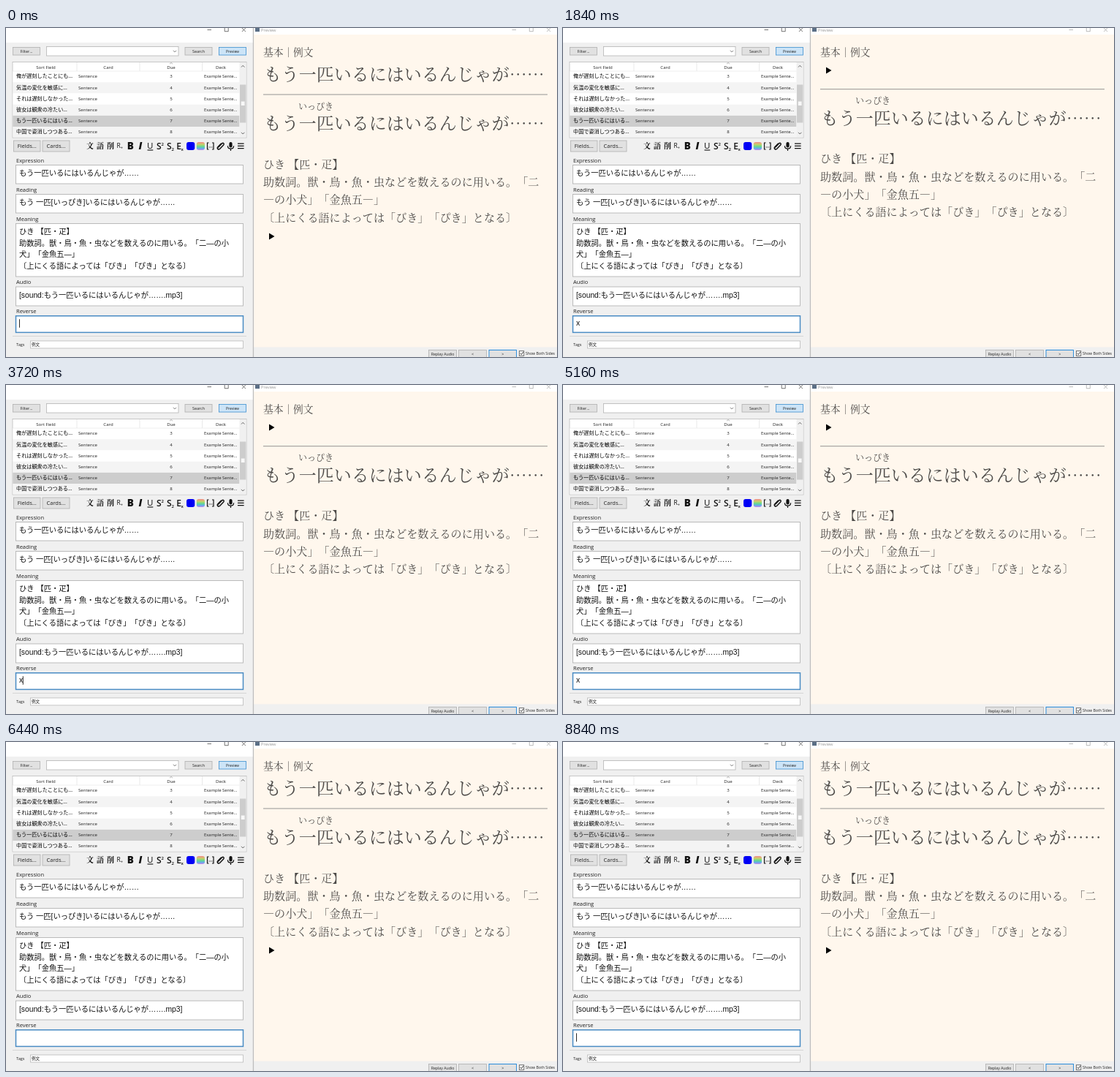
An HTML page for the animation above (8960 ms loop, 754 by 450 pixels).

```html
<!DOCTYPE html>
<html lang="ja">
<head>
<meta charset="utf-8">
<title>Card editor and preview</title>
<style>
html, body { margin: 0; width: 100%; height: 100%; overflow: hidden; background: #f0f0f0; }
svg { display: block; width: 754px; height: 450px; }
text { white-space: pre; text-spacing-trim: space-all; font-feature-settings: "chws" 0; }
.ui { font-family: "Open Sans", "Noto Sans", "Noto Sans CJK JP", sans-serif; fill: #222; }
.field { font-family: "Liberation Sans", "Noto Sans CJK JP", "Noto Sans CJK", sans-serif; fill: #111; }
.row { font-family: "Open Sans", "Noto Sans CJK JP", "Noto Sans CJK", sans-serif; fill: #000; font-weight: 500; }
.card { font-family: "Noto Serif CJK JP", "Noto Serif JP", "Noto Sans CJK JP", "Noto Sans CJK", serif; font-weight: 300; fill: #4c4a48; }
.icon { font-family: "Open Sans", "Noto Sans", sans-serif; fill: #111; }
</style>
</head>
<body>
<svg id="stage" viewBox="0 0 754 450">
  <defs>
    <linearGradient id="rainbow" x2="0" y2="1">
      <stop offset="0" stop-color="#f58a8a"/><stop offset=".3" stop-color="#c8cf6a"/>
      <stop offset=".55" stop-color="#62dc8c"/><stop offset=".8" stop-color="#65a9ee"/>
      <stop offset="1" stop-color="#c987e8"/>
    </linearGradient>
  </defs>
</svg>
<script>
const stage = document.getElementById("stage");

function add(tag, attrs, parent = stage) {
  const el = document.createElementNS(stage.namespaceURI, tag);
  for (const key in attrs) el.setAttribute(key, attrs[key]);
  return parent.appendChild(el);
}
function box(x, y, right, bottom, fill, stroke, more = {}, parent = stage) {
  const attrs = { x, y, width: right - x, height: bottom - y, fill, ...more };
  if (stroke) attrs.stroke = stroke;
  return add("rect", attrs, parent);
}
function label(str, x, y, size, cls = "ui", more = {}, parent = stage) {
  const el = add("text", { x, y, "font-size": size, class: cls, ...more }, parent);
  el.textContent = str;
  return el;
}
function line(d, stroke, width = 1, parent = stage) {
  return add("path", { d, stroke, "stroke-width": width, fill: "none" }, parent);
}
const middle = { "text-anchor": "middle" };

function button(str, x, y, right, bottom, size, fill = "#e1e1e1", stroke = "#b0b0b0") {
  box(x, y, right, bottom, fill, stroke, { "stroke-width": 0.8 });
  label(str, (x + right) / 2, (y + bottom) / 2 + size * 0.36, size, "ui", middle);
}
function windowControls(x, gap, color) {
  line(`M${x} 2.5h5.5M${x + gap} 0v4.7h5v-4.7M${x + 2 * gap} 0l5 5m0-5l-5 5`, color, 0.8);
}

function drawEditor() {
  box(0, 0, 338, 450, "#f0f0f0");
  box(0, 0, 338, 20, "#fff");
  windowControls(275.5, 23.7, "#555");

  button("Filter...", 9.5, 26.5, 46.5, 37, 5.4);
  box(55.5, 25.5, 236, 38, "#fff", "#b5b5b5", { "stroke-width": 0.8 });
  line("M229 30.8l2 2 2-2", "#555", 0.8);
  button("Search", 245, 26.5, 282, 37, 5.4);
  button("Preview", 291.5, 26.5, 328.5, 37, 5, "#cce4f7", "#3c8fd0");

  drawTable();

  button("Fields...", 10.5, 154, 47, 169, 7.5);
  button("Cards...", 50, 154, 87, 169, 7.5);
  drawToolbar();

  drawField("Expression", 187.5, 213, ["もう一匹いるにはいるんじゃが……"]);
  drawField("Reading", 227.5, 253, ["もう 一匹[いっぴき]いるにはいるんじゃが……"]);
  drawField("Meaning", 267.5, 340, ["ひき 【匹・疋】",
    "助数詞。獣・鳥・魚・虫などを数えるのに用いる。「二―の小",
    "犬」「金魚五―」", "〔上にくる語によっては「びき」「ぴき」となる〕"]);
  drawField("Audio", 354, 380, ["[sound:もう一匹いるにはいるんじゃが…….mp3]"]);
  drawField("Reverse", 393.8, 416.4, [], "#4a8cc4", 1.5);

  line("M9 421.5H329", "#cfcfcf", 0.8);
  label("Tags", 14, 435.2, 5.6);
  box(33.5, 428, 324.5, 438, "#fff", "#b8b8b8", { "stroke-width": 0.8 });
  label("例文", 35, 435.2, 5.6);
}

function drawField(name, y, bottom, lines, stroke = "#b4b4b4", width = 0.9) {
  label(name, 14, y - 3.8, 7.5);
  box(13.5, y, 324.5, bottom, "#fff", stroke, { "stroke-width": width });
  lines.forEach((str, i) => label(str, 18, y + 14.6 + i * 15.5, 10.28, "field"));
}

function drawTable() {
  box(9, 46.5, 329, 150, "#fff", "#bcbcbc", { "stroke-width": 0.8 });
  [["Sort Field", 54.5], ["Card", 140], ["Due", 226], ["Deck", 294]]
    .forEach(([str, x]) => label(str, x, 55.6, 6.1, "ui", middle));
  line("M224 49.2l2-1.8 2 1.8", "#777", 0.6);
  const rows = ["俺が遅刻したことにも…", "気温の変化を敏感に…", "それは遅刻しなかった…",
    "彼女は観衆の冷たい…", "もう一匹いるにはいる…", "中国で姿消しつつある…"];
  rows.forEach((str, i) => {
    const y = 59 + i * 15.2, base = y + 9.3;
    const fill = i === 4 ? "#cdcdcd" : i % 2 ? "#f4f4f4" : "#fff";
    box(9.4, y, 319.5, Math.min(y + 15.2, 149.6), fill);
    label(str, 14, base, 7.15, "row");
    label("Sentence", 99, base, 6.05);
    label(i + 3, 226, base, 6.1, "ui", middle);
    label("Example Sente...", 271, base, 5.9);
  });
  line("M97 47V59M183 47V59M268.5 47V59", "#e0e0e0", 0.7);
  line("M9.5 59H319.5", "#e4e4e4", 0.6);
  box(319.5, 47, 328.6, 149.6, "#f0f0f0");
  box(320, 77.5, 328.4, 129.5, "#cdcdcd");
  box(321.8, 100.5, 326.6, 106, "#f8f8f8");
  line("M322 53.5l2.2-2.2 2.2 2.2M322 142.8l2.2 2.2 2.2-2.2", "#555", 0.9);
}

function drawToolbar() {
  const ink = "#111";
  ["文", "語", "削"].forEach((ch, i) =>
    label(ch, 115 + i * 14, 165, 10, "card", { ...middle, style: "fill:#111;font-weight:600" }));
  label("R", 151.5, 163.8, 8.5, "icon");
  label("+", 156.6, 166, 6, "icon");
  const bold = { ...middle, "font-weight": 800 };
  label("B", 170.3, 166, 13.5, "icon", bold);
  label("I", 184, 166, 13.5, "icon", { ...bold, "font-style": "italic" });
  label("U", 197.3, 164.8, 11.5, "icon", middle);
  line("M193.5 167h7.8", ink, 1.1);
  const semi = { "font-weight": 600 };
  [["S", "2", 206, 161], ["S", "2", 220, 168], ["E", "x", 233.2, 167.5]].forEach(([big, small, x, y]) => {
    label(big, x, 165.6, 12, "icon", semi);
    label(small, x + 6.4, y, 6, "icon", semi);
  });
  box(247, 156, 258.3, 167, "#0000f5", null, { rx: 3 });
  box(260.8, 156, 272, 167, "url(#rainbow)", null, { rx: 3 });
  line("M277.5 157h-2v9h2M282 157h2v9h-2", ink, 1.2);
  line("M277.5 163h5", ink, 1.1).setAttribute("stroke-dasharray", "1 1");
  line("M290.5 163.2l5-5.2c1.8-1.6 3.6.4 2.2 2l-5 5.2c-2.2 2-4.6-.6-2.6-2.8l4.6-4.7", ink, 1.5);
  box(305.4, 156, 309.6, 163.5, ink, null, { rx: 2.1 });
  line("M303.4 161.2c0 5.2 8.2 5.2 8.2 0M307.5 165v3", ink, 1.2);
  line("M317 158.2h8.6M317 161.4h8.6M317 164.6h8.6", ink, 1.3);
}

function cardText(str, x, y, size, parent) {
  label(str, x, y, size, "card", {}, parent);
}
function playMark(y, parent) {
  add("path", { d: `M360 ${y - 4.5}v9l7.5-4.5z`, fill: "#000" }, parent);
}

function drawPreview() {
  box(337.8, 0, 339.3, 450, "#bdbdbd");
  box(339.3, 0, 754, 450, "#f0f0f0");
  box(339.3, 0, 754, 9, "#fff");
  box(339.3, 9, 754, 436.5, "#fff7ed");
  box(341, 0, 347, 5, "#5b6f86");
  label("Preview", 349, 4.6, 5.7, "ui", { style: "fill:#999" });
  windowControls(692.5, 23.8, "#aaa");
  cardText("基本｜例文", 352, 37.7, 13.7);

  const front = add("g", {});
  const sentence = "もう一匹いるにはいるんじゃが……";
  cardText(sentence, 352.8, 72, 24, front);
  const emptyFront = add("g", {});
  playMark(58, emptyFront);

  const back = add("g", {});
  line("M352 91H741", "#888", 0.9, back);
  cardText("いっぴき", 400, 111.8, 12, back);
  cardText(sentence, 352.8, 139, 24, back);
  ["ひき 【匹・疋】", "助数詞。獣・鳥・魚・虫などを数えるのに用いる。「二", "―の小犬」「金魚五―」",
    "〔上にくる語によっては「びき」「ぴき」となる〕"]
    .forEach((str, i) => cardText(str, 352, 191.5 + i * 24.4, 15.1, back));
  playMark(285, front);

  button("Replay Audio", 578.5, 440.5, 616.5, 451, 5.2);
  button("<", 619.5, 440.5, 657.5, 451, 5.4);
  button(">", 661, 440.5, 698.5, 451, 5.4, "#e1e1e1", "#0078d7");
  box(702.3, 441.8, 708.8, 448.3, "#fff", "#333", { "stroke-width": 0.7 });
  line("M703.6 445l1.6 1.7 2.6-3.6", "#222", 0.9);
  label("Show Both Sides", 711, 447, 5.2);
  return { front, emptyFront, back };
}

drawEditor();
const { front, emptyFront, back } = drawPreview();
const typed = label("x", 18, 407.4, 10.4, "field");
const caret = box(0, 398.3, 0.9, 409.8, "#111");

const LOOP = 8960, BLINK = 530;
const TYPE_AT = 1120, ERASE_AT = 5520, REFRESH_DELAY = 600;

const show = (el, on) => el.setAttribute("visibility", on ? "visible" : "hidden");

function render(t) {
  const filled = t >= TYPE_AT && t < ERASE_AT;
  const reversed = t >= TYPE_AT + REFRESH_DELAY && t < ERASE_AT + REFRESH_DELAY;
  // Each keystroke restarts the caret's blink.
  const lastKey = t >= ERASE_AT ? ERASE_AT : t >= TYPE_AT ? TYPE_AT : 0;
  show(typed, filled);
  show(caret, (t - lastKey) % (2 * BLINK) < BLINK);
  caret.setAttribute("x", filled ? 22.8 : 18);
  show(front, !reversed);
  show(emptyFront, reversed);
  back.setAttribute("transform", `translate(0 ${reversed ? -7.3 : 0})`);
}

const start = performance.now();
function tick() {
  render((performance.now() - start) % LOOP);
  requestAnimationFrame(tick);
}
tick();
</script>
</body>
</html>
```
